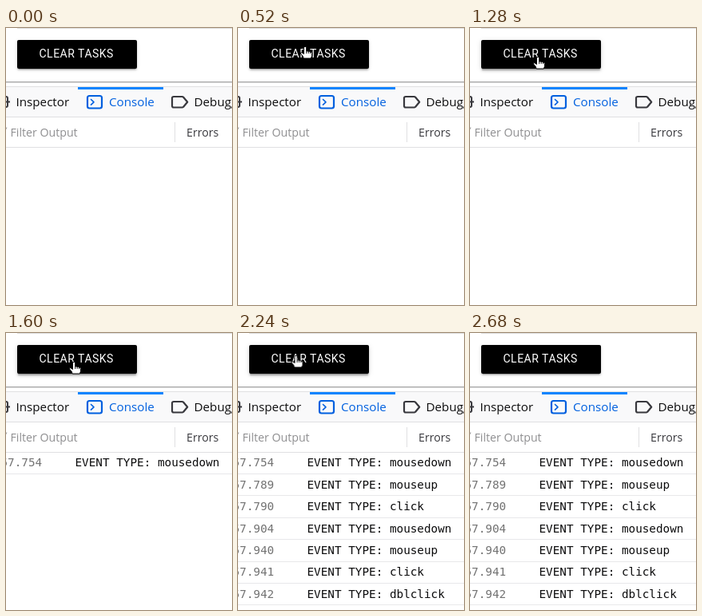
These frames come from a looping animation (283 px wide and 347 px high, 4.16 s). An HTML page:

```html
<!DOCTYPE html>
<html lang="en">
<head>
<meta charset="utf-8">
<title>Console events</title>
<style>
html, body { margin: 0; width: 100%; height: 100%; overflow: hidden; background: #fff; }
body { position: relative; }
svg { position: absolute; left: 0; top: 0; }

.btn {
  position: absolute; left: 14px; top: 15px; width: 150px; height: 36px;
  border-radius: 2px; background: #000;
  animation: lift 4160ms linear infinite;
}
.label { font: 14px Roboto, sans-serif; letter-spacing: .5px; fill: #fff; }
.tab { font: 15.2px "Open Sans", "Noto Sans", sans-serif; fill: #0c0c0d; }
.tool { font: 14.2px "Open Sans", "Noto Sans", sans-serif; fill: #38383d; }
.log { font: 14.32px "DejaVu Sans Mono", monospace; fill: #0c0c0d; white-space: pre; }
.log .time { fill: #737373; }
.on { fill: #0060df; }

.cursor, .hand, .arrow, .row { animation: 4160ms step-end infinite; }
.cursor { animation-name: move; }
.hand { animation-name: hand; }
.arrow { animation-name: arrow; }
.first { animation-name: first; }
.second { animation-name: second; }
.third { animation-name: third; }

@keyframes move {
  0% { transform: translate(66px, -12px); }
  7.692% { transform: translate(66px, -12px); animation-timing-function: steps(5, end); }
  12.499% { transform: translate(83px, 23px); animation-timing-function: steps(3, end); }
  15.384% { transform: translate(83px, 36px); }
  30.769% { transform: translate(84px, 36px); }
  52.884% { transform: translate(79px, 33px); animation-timing-function: steps(6, end); }
  58.653% { transform: translate(34px, 3px); animation-timing-function: steps(6, end); }
  64.423%, 100% { transform: translate(18px, -24px); }
}
@keyframes hand {
  0% { opacity: 0; }
  11.538% { opacity: 1; }
  56.73%, 100% { opacity: 0; }
}
@keyframes arrow {
  0% { opacity: 0; }
  7.692% { opacity: 1; }
  11.538% { opacity: 0; }
  56.73% { opacity: 1; }
  64.423%, 100% { opacity: 0; }
}
@keyframes lift {
  0%, 11.538%, 61.538%, 100% {
    box-shadow: 0 2px 2px 0 rgba(0,0,0,.14), 0 1px 5px 0 rgba(0,0,0,.12), 0 3px 1px -2px rgba(0,0,0,.2);
  }
  15.384%, 56.73% {
    box-shadow: 0 3px 3px 0 rgba(0,0,0,.14), 0 1px 7px 0 rgba(0,0,0,.12), 0 3px 1px -1px rgba(0,0,0,.2);
  }
}
@keyframes first { 0% { opacity: 0; } 38.461%, 100% { opacity: 1; } }
@keyframes second { 0% { opacity: 0; } 41.346%, 100% { opacity: 1; } }
@keyframes third { 0% { opacity: 0; } 43.269%, 100% { opacity: 1; } }
</style>
</head>
<body>
<div class="btn"></div>
<svg width="283" height="347" viewBox="0 0 283 347">
  <rect x="14" width="269" height="1" fill="#dedede"/>
  <text class="label" x="41.5" y="37">CLEAR TASKS</text>

  <!-- tab bar -->
  <rect y="67" width="283" height="1" fill="#a8a8a8"/>
  <rect y="68" width="283" height="1" fill="#dcdcdc"/>
  <rect y="73" width="283" height="39" fill="#f9f9fa"/>
  <rect y="73" width="283" height="1" fill="#e0e0e2"/>
  <rect y="111" width="283" height="1" fill="#e0e0e2"/>
  <rect x="90" y="74" width="107" height="3" fill="#0a84ff"/>
  <path d="M-3 86H0q2 0 2 2v9q0 2-2 2h-3M0 92.5h5" fill="none" stroke="#38383d" stroke-width="2"/>
  <text class="tab" x="12.5" y="98">Inspector</text>
  <g fill="none" stroke="#0060df" stroke-linecap="round" stroke-linejoin="round">
    <rect x="102" y="85" width="18" height="15.5" rx="2.5" stroke-width="2.2"/>
    <path d="M106.5 89.5l3.5 3.3-3.5 3.3" stroke-width="1.6"/>
  </g>
  <text class="tab on" x="129" y="98">Console</text>
  <path d="M210 86h10.5q1 0 1.7.8l5 6-5 6q-.7.7-1.7.7H210q-2 0-2-2v-9.500q0-2 2-2z" fill="none" stroke="#38383d" stroke-width="2.2" stroke-linejoin="round"/>
  <text class="tab" x="235.500" y="98">Debugger</text>

  <!-- filter bar -->
  <path d="M-1.500 130L.8 124.500" stroke="#939395"/>
  <text class="tool" x="5.500" y="136" style="fill:#8f8f91">Filter Output</text>
  <rect x="211" y="118" width="1" height="25" fill="#e0e0e2"/>
  <text class="tool" x="226" y="136">Errors</text>
  <rect y="149" width="283" height="1" fill="#e0e0e2"/>

  <g id="log" class="log"></g>

  <g class="cursor">
    <path class="arrow" d="M0 0v15l3.400-3.200 2.400 5.500 2.600-1.100-2.400-5.300h4.700z" fill="#fff" stroke="#000" stroke-width="1.200"/>
    <g class="hand">
      <path d="M-.5 1.200q1.700-2 3.200 0V6q1.500-.5 2.500.5 1.500-.5 2.400.5 2-.3 2 1.500V12L8.300 15H-.8L-2 12l-2.600-3q-.2-1.700 1.400-1.300L-.5 9.500z" fill="#fff" stroke="#000"/>
      <path d="M2.700 6v3M5.200 6.500V9M7.600 7v2" stroke="#000" stroke-width=".9"/>
    </g>
  </g>
</svg>
<script>
const events = [
  ["754", "mousedown", "first"],
  ["789", "mouseup", "second"],
  ["790", "click", "second"],
  ["904", "mousedown", "third"],
  ["940", "mouseup", "third"],
  ["941", "click", "third"],
  ["942", "dblclick", "third"]
];
const pitch = 27.43;
document.getElementById("log").innerHTML = events.map(([ms, type, step], i) => {
  const base = Math.round(167.3 + pitch * i);
  const rule = Math.round(175.9 + pitch * i);
  return `<g class="row ${step}">
    <text class="time" x="-6.500" y="${base}">57.${ms}</text>
    <text x="86.500" y="${base}">EVENT TYPE: ${type}</text>
    <rect y="${rule}" width="283" height="1" fill="#e8e8ea"/>
  </g>`;
}).join("");
</script>
</body>
</html>
```
